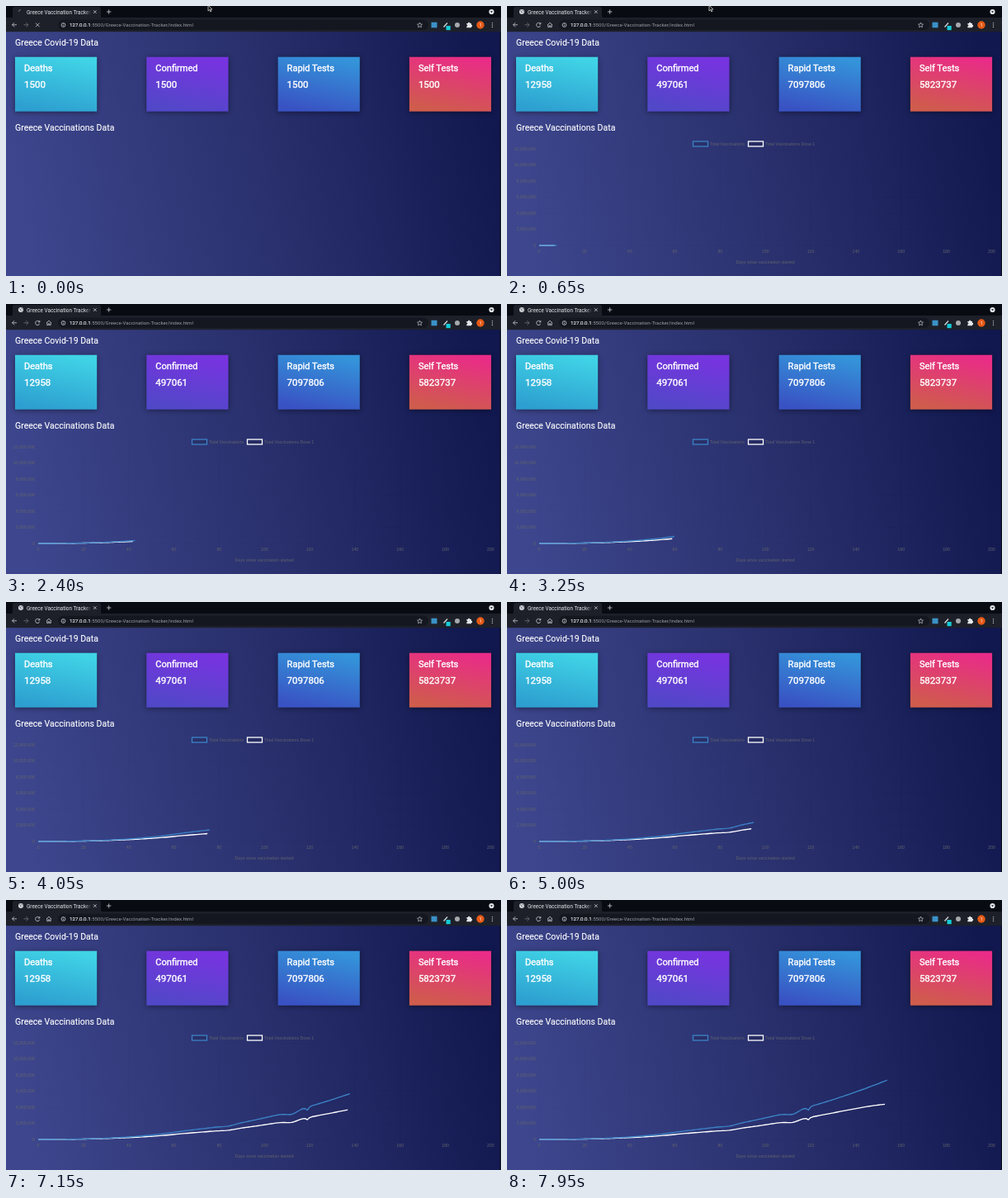
Animation, 600 px wide and 327 px high, one loop 8 s. Source, as an HTML page:

```html
<!DOCTYPE html>
<html lang="en">
<head>
<meta charset="utf-8">
<title>Vaccination dashboard</title>
<style>
  html, body { margin: 0; width: 100%; height: 100%; overflow: hidden; background: #11174e; }
  svg { display: block; width: 100%; height: 100%; font-family: Roboto, sans-serif; }
  .heading { font-size: 10.53px; fill: #fff; stroke: #fff; stroke-width: .12; }
  .card { fill: #fff; stroke: #fff; stroke-width: .4; }
  .card rect { stroke: none; filter: drop-shadow(0 1px 3px rgba(0, 0, 0, .45)); }
  .browser { font-size: 6.17px; fill: #e4e6ea; }
  .icon { fill: none; stroke: #c4c7cd; stroke-width: .85; }
  .chart { font: 5.27px "Liberation Sans", Arial, sans-serif; fill: #62636c; }
  .grid { stroke: #000; stroke-opacity: .06; stroke-width: .45; }
  .line { fill: none; stroke-width: 1.35; stroke-linejoin: round; }
</style>
</head>
<body>
<svg viewBox="0 0 600 327" preserveAspectRatio="none">
  <defs>
    <linearGradient id="page" x1="0" y1=".55" x2="1" y2=".45">
      <stop stop-color="#3e478e"/><stop offset=".5" stop-color="#2a316e"/><stop offset="1" stop-color="#11184f"/>
    </linearGradient>
    <linearGradient id="fade" gradientUnits="userSpaceOnUse" x1="95" x2="104" y1="0" y2="0">
      <stop stop-color="#e4e6ea"/><stop offset="1" stop-color="#e4e6ea" stop-opacity="0"/>
    </linearGradient>
  </defs>

  <rect y="31" width="600" height="296" fill="url(#page)"/>
  <rect x="598.7" y="31" width="1.3" height="296" fill="#0c0f1c"/>
  <text class="heading" x="11" y="48.3">Greece Covid-19 Data</text>
  <text class="heading" x="11" y="151">Greece Vaccinations Data</text>
  <g id="cards"></g>
  <g id="chart" class="chart"></g>

  <g class="browser">
    <rect width="600" height="14.5" fill="#080b12"/>
    <path d="M5 15Q8 15 8 12V4Q8 1 11 1H112Q115 1 115 4V12Q115 15 118 15Z" fill="#1d2029"/>
    <rect y="14" width="600" height="17.2" fill="#1d2029"/>
    <rect x="63" y="16.7" width="449" height="12.4" rx="6.2" fill="#14171f"/>
    <text x="25" y="9.7" font-size="6.4" fill="url(#fade)">Greece Vaccination Tracker</text>
    <text x="77" y="25.2"><tspan stroke="#e4e6ea" stroke-width=".15">127.0.0.1</tspan><tspan fill="#9a9da5">:5500/Greece-Vaccination-Tracker/index.html</tspan></text>
    <g class="icon">
      <path d="M106 5.3l3.6 3.6m0-3.6l-3.6 3.6M122 7h5.4M124.7 4.3v5.4"/>
      <path d="M13 22.8H7.5m2.6-2.6l-2.6 2.6 2.6 2.6"/>
      <path d="M21.5 22.8H27m-2.6-2.6l2.6 2.6-2.6 2.6" stroke="#6d7078"/>
      <circle cx="69.5" cy="23" r="2.4"/><path d="M69.5 22.7v1.7m0-3v.7"/>
      <path d="M501.5 20l.9 2 2.1.2-1.6 1.5.5 2.1-1.9-1.1-1.9 1.1.5-2.1-1.6-1.5 2.1-.2Z" stroke-width=".7"/>
    </g>
    <circle cx="588.5" cy="7" r="3.1"/>
    <path d="M587 6.2h3l-1.5 2Z" fill="#15181f"/>
    <rect x="515.5" y="19.7" width="7" height="6.6" fill="#3b92c8"/>
    <path d="M530.5 25.5l4.5-5" stroke="#d5d7da" stroke-width="1.3"/>
    <rect x="533.5" y="24" width="5.2" height="5.2" fill="#16cbd8"/>
    <circle cx="547" cy="23" r="3" fill="#a7a9ad"/>
    <path d="M558.3 21h1.6a1.3 1.3 0 0 1 2.6 0h1.5v1.8a1.2 1.2 0 0 1 0 2.4v1h-5.7v-1.6a1.1 1.1 0 0 0 0-2.2Z"/>
    <circle cx="575" cy="23" r="4.7" fill="#e65a16"/>
    <text x="575" y="25" text-anchor="middle" font-size="5.5" fill="#fff">1</text>
    <path d="M589.5 20.6v5" stroke="#c4c7cd" stroke-width="1.4" stroke-linecap="round" stroke-dasharray="0 2.4"/>

    <g id="loading" class="icon">
      <path id="spinner" d="M18 4.5A2.5 2.5 0 0 1 20.5 7" stroke="#7e858f"/>
      <path d="M36 20.6l4.6 4.6m0-4.6l-4.6 4.6"/>
    </g>
    <g id="loaded" class="icon">
      <circle cx="18" cy="7" r="3" fill="#dfe2e6" stroke="none"/>
      <path d="M16 5.7l1.5.6.3 1.3-1 .9M18.6 4.7l.7 1.2 1.2.5M18.7 8.9l1.2-1" stroke="#343944" stroke-width=".7"/>
      <path d="M40.4 21.5a2.6 2.6 0 1 0 .3 2.3M40.8 20v2h-2"/>
      <path d="M49 23l3-2.8 3 2.8M49.8 22.6v3h1.5v-1.8h1.4v1.8h1.5v-3"/>
    </g>
    <path id="cursor" d="M245-1V6l1.7-1.5 1.2 2.5 1-.5-1.2-2.4h2.2Z" fill="#111" stroke="#e8e8e8" stroke-width=".7"/>
  </g>
</svg>
<script>
const LOOP = 8000, LOAD = 250, CHART_START = 260, DAY_MS = 50, CURSOR_OUT = 1000;
const byId = id => document.getElementById(id);

function add(parent, tag, attrs, text = "") {
  const node = document.createElementNS("http://www.w3.org/2000/svg", tag);
  for (const key in attrs) node.setAttribute(key, attrs[key]);
  node.textContent = text;
  return parent.appendChild(node);
}

const cards = [
  ["Deaths", 12958, "#40d3e6", "#2d9fd0"],
  ["Confirmed", 497061, "#7833e0", "#5148c8"],
  ["Rapid Tests", 7097806, "#3494da", "#3952c3"],
  ["Self Tests", 5823737, "#e92c87", "#cf5c4c"]
].map(([title, value, top, bottom], i) => {
  const x = 11 + i * 159.3, group = add(byId("cards"), "g", { class: "card" });
  const gradient = add(group, "linearGradient", { id: "card" + i, x1: .65, y1: 0, x2: .35, y2: 1 });
  add(gradient, "stop", { "stop-color": top });
  add(gradient, "stop", { offset: 1, "stop-color": bottom });
  add(group, "rect", { x, y: 61.7, width: 99.2, height: 66, fill: `url(#card${i})` });
  add(group, "text", { x: x + 11, y: 78.8, "font-size": 11.05 }, title);
  return { value, label: add(group, "text", { x: x + 11, y: 98.5, "font-size": 11.5 }) };
});

const chart = byId("chart"), BASE = 290;
const dayX = day => 39 + day * 2.742;

for (let i = 0; i <= 6; i++) {
  const y = BASE - i * 19.45;
  add(chart, "path", { class: "grid", d: `M35.5 ${y}H587.5` });
  add(chart, "text", { x: 35, y: y + 1.6, "text-anchor": "end" }, (i * 2e6).toLocaleString("en-US"));
}
for (let day = 0; day <= 200; day += 20) {
  add(chart, "path", { class: "grid", d: `M${dayX(day)} 173.3V293.5` });
  add(chart, "text", { x: dayX(day), y: 299.4, "text-anchor": "middle" }, day);
}
add(chart, "text", { x: 313, y: 312.4, "text-anchor": "middle" }, "Days since vaccination started");

// Doses grow as a power of time, with a few faster and slower spells.
const bump = (day, center, height, width) => height * Math.exp(-(((day - center) / width) ** 2));
const total = day => 72 * (day / 154) ** 2.35
  + bump(day, 66, 1, 11) - bump(day, 84, 1.2, 4) - bump(day, 112, 3.6, 3.5) - bump(day, 119, 3.8, .8);
const firstDoseShare = day => .675 + .3 * Math.exp(-day / 25) - .08 * (day / 154) ** 12;

// The later series is painted beneath the first.
const series = [
  { name: "Total Vaccinations", color: "#3c82c6", x: 225.5, lag: 0, height: total },
  { name: "Total Vaccinations Dose 1", color: "#fff", x: 292.5, lag: 1,
    height: day => total(day) * firstDoseShare(day) }
];

for (const s of [...series].reverse()) {
  s.path = add(chart, "path", { class: "line", stroke: s.color });
  add(chart, "rect", { x: s.x, y: 164, width: 18, height: 6, fill: "rgba(0,0,0,.1)", stroke: s.color, "stroke-width": 1.3 });
  add(chart, "text", { x: s.x + 20.5, y: 168.5 }, s.name);
}

function curve(height, lastDay) {
  const point = day => `${dayX(day).toFixed(2)} ${(BASE - height(day)).toFixed(2)}`;
  let d = "M" + point(0);
  for (let day = 1; day < lastDay; day++) d += "L" + point(day);
  return d + "L" + point(lastDay);
}

const show = (id, visible) => byId(id).style.display = visible ? "" : "none";

function draw(t) {
  const ready = t >= LOAD;
  show("loading", !ready);
  show("loaded", ready);
  show("chart", ready);
  show("cursor", t < CURSOR_OUT);
  byId("spinner").setAttribute("transform", `rotate(${t * .36 - 90} 18 7)`);
  for (const c of cards) c.label.textContent = ready ? c.value : 1500;
  for (const s of series) {
    const day = Math.max(0, (t - CHART_START) / DAY_MS - s.lag);
    s.path.setAttribute("d", curve(s.height, day));
  }
}

const start = performance.now();
function frame() {
  draw((performance.now() - start) % LOOP);
  requestAnimationFrame(frame);
}
frame();
</script>
</body>
</html>
```
